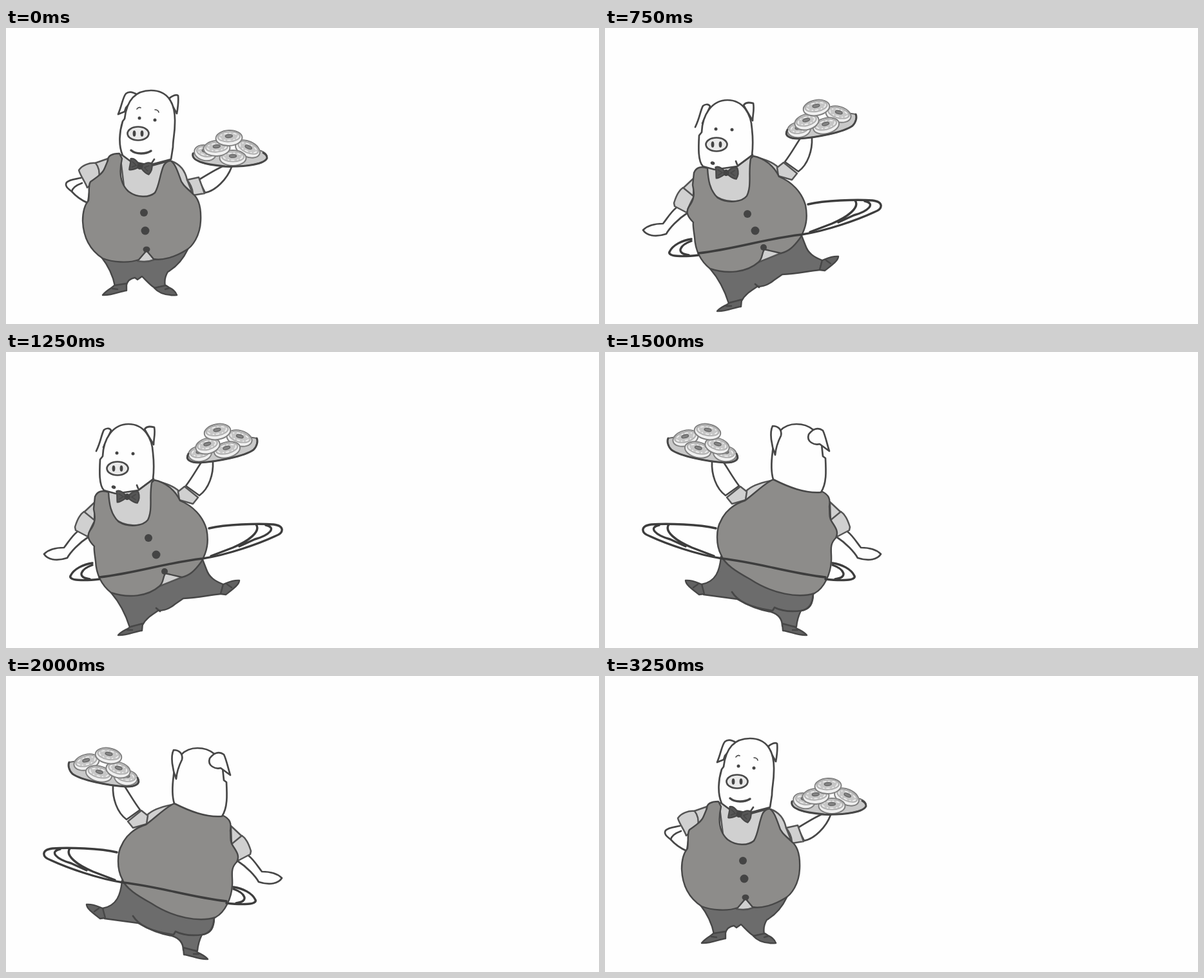
Animation, 920 px wide and 460 px high, one loop 3500 ms. Source, as an HTML page:

```html
<!DOCTYPE html>
<html lang="en">
<head>
<meta charset="utf-8">
<title>Dancing waiter</title>
<style>
  html, body { margin: 0; width: 100%; height: 100%; overflow: hidden; background: #fefefe; }
  svg { display: block; width: 920px; height: 460px; }
  path { stroke: #474747; stroke-width: 2.7; stroke-linecap: round; stroke-linejoin: round; fill: none; }
  .skin { fill: #fefefe; }
  .shirt { fill: #d0d0d0; stroke: #555; stroke-width: 2.5; }
  .vest { fill: #8d8c8a; stroke-width: 2.4; }
  .pants { fill: #6c6c6c; stroke-width: 2.4; }
  .shoe { fill: #626262; stroke-width: 2.4; }
  .tray { fill: #c9c9c9; stroke: #666; stroke-width: 1.8; }
  .rim { stroke-width: 3; }
  .thin { stroke-width: 1.6; }
  .bold { stroke-width: 3.4; }
  .hoop { stroke: #3d3d3d; stroke-width: 3.4; }
  .tie { fill: #565656; stroke-width: 2.2; }
  .dark { fill: #444; }
  .snout { fill: #e9e9e9; stroke: #4a4a4a; stroke-width: 2.7; }
  .dough { fill: #f0f0f0; stroke: #808080; stroke-width: 2; }
  .icing { fill: #c6c6c6; stroke: #a4a4a4; stroke-width: 1.2; }
  .sugar { fill: none; stroke: #f0f0f0; stroke-width: 1.6; stroke-dasharray: 5 3 2 4; }
  .hole { fill: #858585; stroke: #666; stroke-width: 1.4; }
</style>
</head>
<body>
<svg id="stage" viewBox="0 0 920 460"></svg>
<script>
const line = (d, cls = '') => `<path class="${cls}" d="${d}"/>`;
const oval = (x, y, rx, ry, cls = 'dark', turn = 0) =>
  `<ellipse class="${cls}" cx="${x}" cy="${y}" rx="${rx}" ry="${ry}" transform="rotate(${turn} ${x} ${y})"/>`;
const dot = (x, y, r) => oval(x, y, r, r);
const group = (content, transform = '') => `<g transform="${transform}">${content}</g>`;
const mirror = content => group(content, 'translate(487 0) scale(-1 1)');

const donut = (x, y, turn, rx = 20.5) => group(
  oval(0, 0, rx, 12, 'dough') +
  oval(0, -2, rx - 3, 8, 'icing') +
  oval(0, -2, rx - 6, 5.5, 'sugar') +
  oval(0, -3, 5.5, 2.4, 'hole'),
  `translate(${x} ${y}) rotate(${turn})`);

const snout = (x, y) => oval(x, y, 16.5, 10.5, 'snout') +
  oval(x - 6, y, 2.4, 4.7) + oval(x + 6, y, 2.4, 4.7);

const bowTie = (x, y, turn) => group(
  line('M-3 -3 C-8 -8 -13 -10 -17 -8 C-15 -2 -16 4 -15 9 C-11 9 -7 6 -3 3Z', 'tie') +
  line('M3 -3 C8 -8 13 -10 17 -8 C19 -3 19 4 16 9 C11 9 7 6 3 3Z', 'tie') +
  line('M-13 -4 L-6 0 L-12 4 M13 -4 L7 0 L13 4', 'thin') +
  oval(0, 0, 4.5, 5),
  `translate(${x} ${y}) rotate(${turn})`);

const openArm = line('M111 279 C103 285 97 295 90 304 C80 304 67 306 59 314 C64 322 77 326 95 320 C100 311 113 297 127 288', 'skin');
const hipArm = line('M116 233 C108 235 99 235 94 240 C91 245 95 249 102 254 C108 261 118 268 127 272 L130 250', 'skin') +
  line('M102 254 Q104 246 118 241');

const smile = line('M203 126 Q206 122 209 124 M231 127 Q236 127 237 131', 'thin') +
  line('M194 190 C202 197 217 196 225 191', 'bold');
const gasp = (x, y) => oval(x, y, 3.4, 2.6, 'dark', 20);

function standing(arm, mouth) {
  return line('M148 356 C159 370 166 385 169 401 L187 399 C189 392 194 389 200 388 L204 391 L211 386 C220 395 225 401 231 404 L247 401 C245 391 248 384 251 379 C263 372 274 361 282 344Z', 'pants') +
    line('M150 415 C155 408 163 405 168 400 L187 397 L187 408 C177 409 165 416 150 415Z M165 405 L173 406', 'shoe') +
    line('M230 404 L248 400 C253 404 262 406 265 415 C250 416 237 412 230 404Z M247 406 L254 404', 'shoe') +
    line('M218 344 L204 362 Q218 365 230 360Z', 'shirt') +
    arm +
    line('M158 203 L138 210 L142 235 L156 225Z', 'shirt') +
    line('M113 221 C118 213 130 209 139 210 C144 216 146 223 144 234 L126 248 C123 239 115 229 113 221Z', 'shirt') +
    line('M299 236 C312 228 325 220 336 215 L350 216 C343 235 325 253 309 256Z', 'skin') +
    line('M257 207 C271 212 278 222 281 236 L289 256 L266 238Z', 'shirt') +
    line('M281 236 L299 232 L308 257 L290 260 Q290 247 281 236Z', 'shirt') +
    line('M177 197 L252 207 L240 258 Q213 272 184 254Z', 'shirt') +
    line('M174 134 C180 120 181 108 186 102 C191 98 198 100 204 104 L186 124 L184 130Z', 'skin') +
    line('M252 111 C257 105 264 103 267 105 C268 115 267 122 265 133 L256 117', 'skin') +
    line('M193 207 L181 198 C174 182 176 161 181 145 L184 141 C187 115 199 97 225 97 C252 97 263 118 262 147 C262 165 259 172 259 185 L256 204 L222 213Z', 'skin') +
    dot(207, 140, 2.5) + dot(231, 143, 2.5) + snout(205, 164) + mouth +
    line('M158 206 C158 198 165 195 176 195 L180 203 C175 225 178 243 190 254 C203 264 222 264 231 256 C238 245 239 225 245 213 Q249 207 255 206 C262 210 266 222 270 233 C272 243 282 250 289 257 C300 265 303 280 302 300 C301 322 290 340 278 346 C262 356 241 362 229 359 L218 346 L206 360 C190 366 165 364 150 358 C130 345 120 325 119 300 C119 285 122 275 128 268 C130 255 127 245 131 239 C141 232 150 226 153 218Z', 'vest') +
    line('M226 214 L255 206 M226 210 L230 204') + bowTie(208, 215, 14) +
    dot(214, 287, 6) + dot(216, 315, 6.5) + oval(218, 344, 5.5, 4.5) +
    line('M291 194 C285 206 306 212 340 215 C375 216 402 210 405 202 C406 196 400 192 393 190Z', 'tray') +
    donut(309, 194, 12, 17) + donut(375, 188, 24, 20) + donut(352, 202, 0) +
    donut(327, 187, -4) + donut(346, 171, -3) +
    line('M290 195 C287 206 306 212 340 215 C375 216 402 211 405 202 Q405 197 399 194', 'rim');
}

const trayArm =
  line('M279 208 C289 195 297 180 304 170 L321 170 C322 190 315 212 300 223Z', 'skin') +
  line('M230 200 C245 203 260 208 268 216 C272 221 272 227 270 232 L246 222Z', 'shirt') +
  line('M267 217 L277 209 L298 226 L290 236 L269 230Z', 'shirt') +
  line('M285 155 C276 167 286 172 300 172 C330 170 370 162 384 152 C390 146 391 138 389 134 L376 132Z', 'tray') +
  donut(301, 158, -8, 18) + donut(362, 134, 15, 20) + donut(343, 152, -14) +
  donut(313, 146, -14, 19) + donut(328, 124, -10) +
  line('M283 158 C277 168 287 172 300 172 C330 170 370 162 384 152 C390 146 391 138 389 134', 'rim');

const freeArm = openArm +
  line('M138 233 L121 249 L137 263Z', 'shirt') +
  line('M107 272 C110 262 115 252 121 248 L138 262 C132 272 129 280 127 287 L108 277Z', 'shirt');

const shoes =
  line('M193 427 L212 422 L211 433 C200 434 188 441 174 440 C180 433 189 431 193 427Z M188 432 L196 432', 'shoe') +
  line('M337 361 C345 358 352 354 362 355 C362 362 350 370 341 377 L333 376Z M343 361 L350 366', 'shoe');

const hoop =
  line('M315 274 C340 268 390 266 415 268 C432 270 432 281 418 286 C392 298 345 315 305 321 C250 327 200 344 145 350 M145 353 C120 356 97 355 100 348 C105 337 120 330 134 328', 'hoop') +
  line('M388 268 C396 279 376 294 352 304 L318 317 M403 269 C421 273 408 285 386 291 L362 302 M134 331 C117 337 108 350 130 353', 'hoop');

const front =
  line('M163 374 C175 388 185 405 192 428 L212 424 C217 414 227 408 236 402 C245 402 255 398 262 392 L275 383 C295 382 315 378 333 376 L337 361 C324 356 315 350 311 338 L304 320 L274 345Z', 'pants') +
  line('M239 403 L233 398') + shoes +
  line('M247 342 L238 364 L273 350Z', 'shirt') +
  freeArm + trayArm +
  line('M156 216 L228 199 L224 264 Q190 278 164 256Z', 'shirt') +
  line('M140 154 C147 140 148 128 152 121 C157 117 162 119 163 122 L151 148', 'skin') +
  line('M215 120 C219 114 226 116 230 117 C232 127 229 135 229 144Z', 'skin') +
  line('M170 220 L152 215 C144 207 145 185 146 167 L150 162 C151 136 165 112 190 112 C215 112 227 135 228 157 C230 175 229 190 228 198 L205 215Z', 'skin') +
  dot(172, 157, 2.5) + dot(197, 158, 2.5) + snout(173, 181) + gasp(167, 210) +
  line('M138 225 C141 217 149 214 159 218 C160 235 162 252 175 264 C190 273 212 271 220 261 C228 245 222 225 226 203 L230 199 C247 202 263 215 270 231 C290 239 305 255 311 275 C315 295 312 310 303 326 C292 341 285 347 273 350 L247 344 C242 354 245 358 238 364 C220 380 190 383 163 374 C148 362 140 345 139 325 C137 310 136 305 137 302 C128 293 125 286 130 278 C139 266 139 257 136 244Z', 'vest') +
  line('M205 215 L229 197 M205 212 L203 207') + bowTie(188, 225, 2) +
  dot(221, 289, 6) + dot(233, 315, 6.5) + oval(246, 341, 5, 5) + hoop;

const back =
  line('M180 318 C178 340 172 357 150 361 L153 377 L205 384 C225 396 245 402 258 404 C270 408 275 415 275 426 L297 427 C298 416 301 408 304 402 C318 400 323 392 323 374Z', 'pants') +
  line('M197 373 C210 394 245 400 260 402 L263 397 C275 403 290 404 305 402 C318 399 322 390 323 376') +
  mirror(shoes + freeArm + trayArm) +
  line('M261 198 C249 203 232 220 217 231 C200 236 186 248 180 262 C172 275 172 300 180 315 C185 330 205 342 225 353 C260 376 300 383 325 375 C340 367 350 345 351 325 C352 310 347 300 358 289 C363 280 358 273 352 264 C347 257 349 250 348 240 C350 228 347 222 337 217Z', 'vest') +
  line('M261 198 C257 185 258 170 260 155 C261 125 278 112 297 112 C318 112 332 125 336 143 L338 162 L342 165 C343 185 344 205 335 218 C310 220 285 210 261 198Z', 'skin') +
  line('M264 160 C258 145 255 125 260 115 C268 115 275 120 273 130 C268 140 265 148 264 160Z', 'skin') +
  line('M348 154 C345 145 342 130 338 122 C330 116 322 120 316 128 C312 140 325 145 333 143Z', 'skin') +
  mirror(hoop);

const raisedArm = group(openArm, 'translate(0 -46)');
const poses = {
  rest: standing(hipArm, smile),
  wave: standing(raisedArm, smile),
  gasp: standing(raisedArm, gasp(199, 193)),
  front, back
};
const BEAT = 250;
const dance = ('rest wave gasp front back front back front back back ' +
  'front gasp wave rest').split(' ');

const stage = document.getElementById('stage');
stage.innerHTML = Object.entries(poses)
  .map(([name, art]) => `<g id="${name}">${art}</g>`).join('');

function draw(ms) {
  const current = dance[Math.floor(ms / BEAT) % dance.length];
  for (const pose of stage.children) {
    pose.style.display = pose.id === current ? '' : 'none';
  }
}

const start = performance.now();
function tick() {
  draw(performance.now() - start);
  requestAnimationFrame(tick);
}
tick();
</script>
</body>
</html>
```
